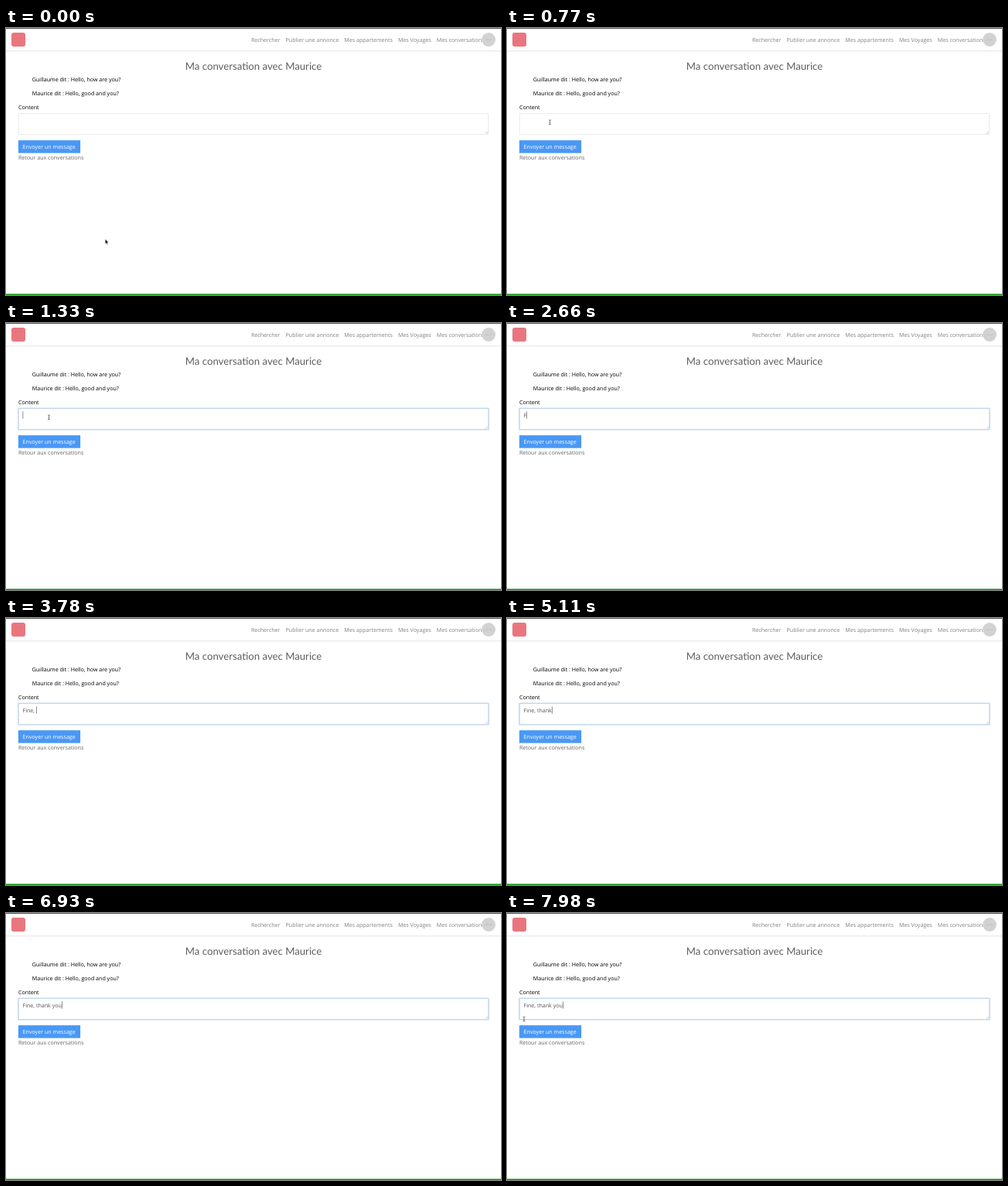
Animation, 640 px wide and 345 px high, one loop 8 s. Source, as an HTML page:

```html
<!DOCTYPE html>
<html lang="fr">
<head>
<meta charset="utf-8">
<title>Conversation</title>
<style>
  html, body { margin: 0; width: 100%; height: 100%; overflow: hidden; background: #fff; }
  svg { display: block; width: 100%; height: 100%; }
  text { font: 7.11px "Open Sans", "Noto Sans", sans-serif; text-rendering: geometricPrecision; }
  .nav { fill: #808080; text-anchor: end; }
  .body { fill: #000; }
  .title { font: 13.2px Lato, sans-serif; fill: #5e5e5e; text-anchor: middle; }
  .link { fill: #666; }
  .typed { fill: #555; white-space: pre; }
  .label { fill: #fff; }
  .tiny { font-size: 2.4px; fill: #aaa; text-anchor: middle; }
</style>
</head>
<body>
<svg viewBox="0 0 640 345" preserveAspectRatio="none">
  <rect width="640" height="345" fill="#fff"/>
  <rect y="29" width="640" height="1" fill="#ececec"/>
  <rect y="30" width="640" height="1" fill="#f8f8f8"/>
  <rect width="640" height="1" fill="#555"/>
  <rect y="343.5" width="640" height="1.5" fill="#0f960f"/>

  <rect x="7" y="6" width="18" height="18" rx="3" fill="#e9767f"/>
  <text id="nav" class="nav" x="611.5" y="17.7"></text>
  <circle cx="624" cy="15" r="8.9" fill="#d2d2d2"/>
  <text class="tiny" x="624" y="15.8">40 x 40</text>

  <text class="title" x="320" y="54.3">Ma conversation avec Maurice</text>
  <text class="body" x="33.8" y="68.9">Guillaume dit : Hello, how are you?</text>
  <text class="body" x="33.8" y="86.7">Maurice dit : Hello, good and you?</text>
  <text class="body" x="16" y="104.5">Content</text>

  <rect x="16.2" y="110.7" width="607.4" height="26.8" fill="#fff" stroke="#dedede" stroke-width=".6"/>
  <g id="focus" fill="none">
    <rect x="15.5" y="110" width="609" height="28.2" rx="1" stroke="#d8e6f6" stroke-width="1.3"/>
    <rect x="16.2" y="110.7" width="607.4" height="26.8" stroke="#b4cde8" stroke-width=".6"/>
  </g>
  <path d="M619.8 136.6l3-3M621.6 136.6l1.2-1.2" stroke="#999" stroke-width=".5"/>
  <text id="typed" class="typed" x="21.5" y="121.6"></text>
  <rect id="caret" y="114.3" width=".6" height="9.4" fill="#444"/>

  <rect x="15.9" y="145.1" width="80.2" height="16.5" fill="#4a98f5"/>
  <text class="label" x="21.6" y="156.2">Envoyer un message</text>
  <text class="link" x="15.9" y="169.8">Retour aux conversations</text>

  <path id="arrow" d="M0 0V6.1L1.4 4.9L2.3 7L3.3 6.6L2.4 4.5H4.2Z" fill="#000" stroke="#fff" stroke-width=".4"/>
  <path id="beam" d="M-1.5 -3Q0 -3 0 -2.2Q0 -3 1.5 -3M0 -2.4V2.4M-1.5 3Q0 3 0 2.2Q0 3 1.5 3M-.7 .8H.7" fill="none" stroke="#333" stroke-width=".6"/>
</svg>
<script>
const LOOP = 8000, TICK = 70, KEY = 140, BLINK = 490;
const FOCUS = 1190, HIDE = 2450, SHOW = 7700;
const NAV = ["Rechercher", "Publier une annonce", "Mes appartements", "Mes Voyages", "Mes conversations"];
const BURSTS = [[2520, "F"], [3220, "ine, "], [4550, "thank"], [5460, " you"]];
const REST = [128.3, 272.8], FIELD = [55.5, 121.8], EXIT = [22, 137];

const $ = id => document.getElementById(id);
const [focus, typed, caret, arrow, beam] = ["focus", "typed", "caret", "arrow", "beam"].map($);

for (const label of NAV) {
  const item = document.createElementNS("http://www.w3.org/2000/svg", "tspan");
  item.setAttribute("dx", 7.11);
  item.textContent = label;
  $("nav").append(item);
}

const clamp = v => Math.min(1, Math.max(0, v));
const ease = v => v * v * (3 - 2 * v);
const show = (el, on) => el.setAttribute("visibility", on ? "visible" : "hidden");

// One letter per KEY within each burst; every key press restarts the blink.
function typing(t) {
  let text = "", last = FOCUS;
  for (const [start, word] of BURSTS) {
    if (t < start) break;
    const count = Math.min(word.length, Math.floor((t - start) / KEY) + 1);
    text += word.slice(0, count);
    last = start + (count - 1) * KEY;
  }
  return { text, lit: t >= FOCUS && (t - last) % (2 * BLINK) < BLINK };
}

function glide(from, to, k) {
  return from.map((v, i) => v + (to[i] - v) * ease(clamp(k)));
}

function pointer(t) {
  return t < SHOW
    ? glide(REST, FIELD, t / 630)
    : glide(FIELD, EXIT, (t - SHOW + TICK) / 350);
}

function render(now) {
  const t = Math.floor((now % LOOP) / TICK + 1e-6) * TICK;

  focus.setAttribute("opacity", clamp((t - FOCUS + KEY) / (2 * KEY)));

  const { text, lit } = typing(t);
  if (typed.textContent !== text) typed.textContent = text;
  caret.setAttribute("x", 21.6 + (text ? typed.getComputedTextLength() : 0));
  show(caret, lit);

  const [x, y] = pointer(t);
  const visible = t < HIDE || t >= SHOW;
  const inField = y > 110 && y < 138;
  for (const el of [arrow, beam]) el.setAttribute("transform", `translate(${x} ${y})`);
  show(arrow, visible && !inField);
  show(beam, visible && inField);
}

const began = performance.now();
function loop() {
  render(performance.now() - began);
  requestAnimationFrame(loop);
}
loop();
</script>
</body>
</html>
```
